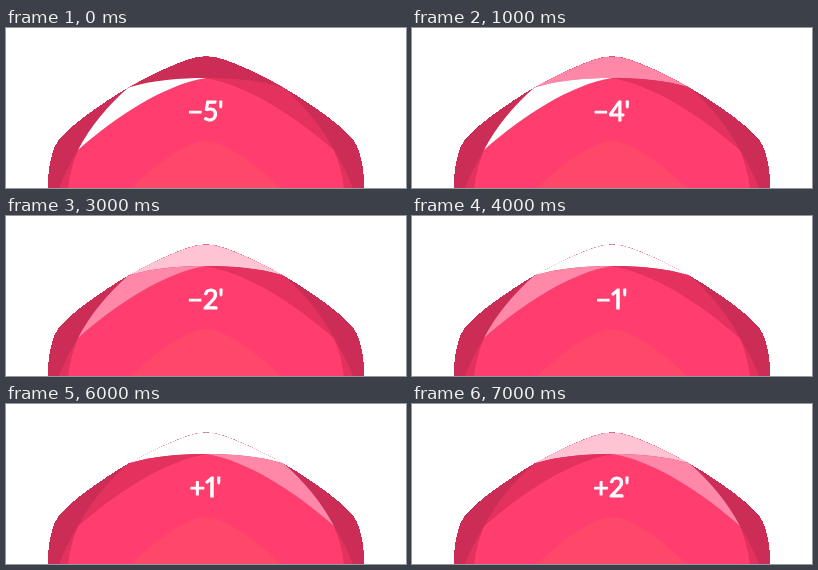
Animation, 400 px wide and 160 px high, one loop 8 s. Source, as an HTML page:

```html
<!DOCTYPE html>
<html lang="en">
<head>
<meta charset="utf-8">
<style>
  html, body { margin: 0; width: 100%; height: 100%; overflow: hidden; background: #fff; }
  svg { display: block; width: 100%; height: 100%; }
  text {
    font: 400 27px Lato, "Open Sans", sans-serif;
    font-variant-numeric: proportional-nums;
    fill: #fff; stroke: #fff; stroke-width: 1; stroke-linejoin: round;
    text-anchor: middle;
  }
</style>
</head>
<body>
<svg viewBox="0 0 400 160">
  <defs>
    <path id="facet" d="M72 122C84 99 102 77 122.500 59.500C147 52 174 50 200 50C159 56.500 111.500 87.500 72 122Z"/>
    <path id="side" d="M72 122Q60 142 52.500 161H62Q64 140 72 122Z"/>
  </defs>
  <path fill="#cc2d56" shape-rendering="crispEdges" d="M41.500 161C42 144 44 130 49 118C53 109 65 99 78 89C94 77 108 68 122.500 59.500C144 47 166 37 182 31.500Q200 25 218 31.500C234 37 256 47 277.500 59.500C292 68 306 77 322 89C335 99 347 109 351 118C356 130 358 144 358.500 161Z"/>
  <path fill="#ff3d6e" d="M61.500 161Q64 140 72 122C111.500 87.500 159 56.500 200 50C241 56.500 288.500 87.500 328 122Q336 140 338.500 161Z"/>
  <path fill="#ff4769" d="M124 161C146 139 181 113 200 113C219 113 254 139 276 161Z"/>
  <use href="#side" fill="#e2325d"/>
  <use href="#side" fill="#e2325d" transform="matrix(-1 0 0 1 400 0)"/>
  <path id="top" d="M122.500 59.500C144 47.200 166 37.200 182 31.700Q200 25.200 218 31.700C234 37.200 256 47.200 277.500 59.500C253 52 226 50 200 50C174 50 147 52 122.500 59.500Z"/>
  <use id="left" href="#facet"/>
  <use id="right" href="#facet" transform="matrix(-1 0 0 1 400 0)"/>
  <text id="label" x="199.500" y="92.500"></text>
</svg>
<script>
  const $ = id => document.getElementById(id);
  const DEEP = '#cc2d56', DARK = '#e2325d', MID = '#ff88a8', PALE = '#ffc4d3', WHITE = '#fdfefd';

  // One row per second: label, left, top, right
  const steps = [
    ['−5\'', WHITE, DEEP, DARK],
    ['−4\'', WHITE, MID, DARK],
    ['−3\'', PALE, MID, DARK],
    ['−2\'', MID, PALE, DARK],
    ['−1\'', MID, WHITE, DARK],
    ['0\'', DARK, WHITE, DARK],
    ['+1\'', DARK, WHITE, MID],
    ['+2\'', DARK, PALE, MID]
  ];

  function draw(ms) {
    const [label, left, top, right] = steps[Math.floor(ms / 1000) % steps.length];
    $('label').textContent = label;
    $('left').setAttribute('fill', left);
    $('top').setAttribute('fill', top);
    $('right').setAttribute('fill', right);
  }

  const start = performance.now();
  function tick() {
    draw(performance.now() - start);
    requestAnimationFrame(tick);
  }
  tick();
</script>
</body>
</html>
```
